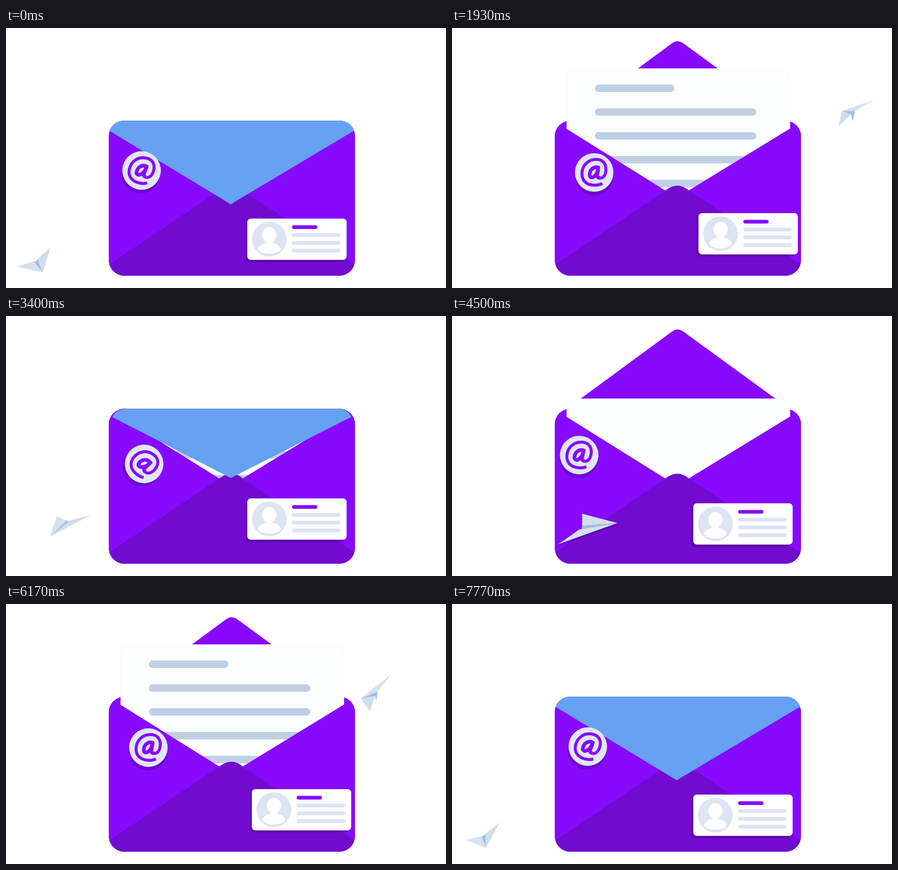
Recreate the animation shown at these times as an HTML page. Size 972 by 573 pixels, loop 7.91 s.

```html
<!DOCTYPE html>
<html lang="en">
<head>
<meta charset="utf-8">
<title>Mail envelope</title>
<style>
html, body { margin: 0; width: 100%; height: 100%; overflow: hidden; background: #fff; }
svg { display: block; width: 100%; height: 100%; }
.main { fill: #870aff; }
.dark { fill: #720bd0; }
.pale { fill: #dde4f2; }
.shade { fill: rgb(50, 0, 90); fill-opacity: .3; }
#lines line { stroke: #c0cfe3; stroke-width: 16.5; stroke-linecap: round; }
#sign path { fill: none; stroke: #870aff; stroke-linejoin: round; }
</style>
</head>
<body>
<svg viewBox="0 0 972 573">
  <defs>
    <clipPath id="body"><rect x="227" y="204" width="544" height="342" rx="35"/></clipPath>
  </defs>

  <rect class="main" x="227" y="204" width="544" height="342" rx="35"/>
  <g id="openFlap">
    <path class="main" d="M253 205L485 34.5Q498 24 512 34.5L746 205Z"/>
  </g>

  <g id="paper">
    <rect x="253.5" y="89.5" width="493" height="330" rx="22" fill="#fdfffe" stroke="#f6f6f9"/>
    <g id="lines"></g>
  </g>

  <g clip-path="url(#body)">
    <path class="main" d="M227 206L471 358L499 376L523 358L771 206.8V546H227Z"/>
    <path class="dark" d="M227 521.5L471 358Q498.5 337 523 358L771 521.5V546H227Z"/>
  </g>

  <g id="shutFlap">
    <path fill="#66a1f4" d="M228.5 226.5A34 34 0 0 1 261 204H737A34 34 0 0 1 769.5 226L503 384.5Q496.5 391.5 490 384.5Z"/>
  </g>

  <g id="badge">
    <circle class="shade" cy="8" r="42.5"/>
    <circle r="42.5" fill="#e0e7f4"/>
    <g id="sign">
      <path stroke-width="6.5" d="M18 24C13 27 7 28 1 28C-17 28 -27 18 -27 3C-27 -15 -14 -29 5 -29C18 -29 26 -20 26 -7C26 6 20 12.5 13 12.5"/>
      <path stroke-width="8" d="M9 -11C-2 -14 -10 -5 -10 5C-10 12 -3 13 2 7C6 3 8 -3 9 -11L7 5C6 10 9 12 13 12"/>
    </g>
  </g>

  <g id="card">
    <rect class="shade" x="-4" y="5" width="219" height="91" rx="8"/>
    <rect width="219.5" height="91" rx="8" fill="#fff"/>
    <circle class="pale" cx="48.8" cy="45.3" r="38.3"/>
    <g fill="#fff">
      <ellipse cx="48.8" cy="36.3" rx="15.7" ry="17.3"/>
      <path d="M41.5 48H56V54C67 56 73 61 74 68C66 81 31 81 23.5 68C25 61 31 56 41.5 54Z"/>
    </g>
    <rect class="main" x="99" y="14.7" width="56" height="8.2" rx="4.1"/>
    <g class="pale">
      <rect x="99" y="32" width="107" height="8.2" rx="4.1"/>
      <rect x="99" y="49.3" width="107" height="8.2" rx="4.1"/>
      <rect x="99" y="66.5" width="107" height="8.2" rx="4.1"/>
    </g>
  </g>

  <g clip-path="url(#body)"><path id="planeShade" class="shade" transform="translate(1 4)"/></g>
  <path id="keel" fill="#a6bedc"/>
  <path id="wingA" fill="#d6e1ef"/>
  <path id="wingB" fill="#d1ddec"/>
</svg>

<script>
const LOOP = 7910, LAST = 7770, CYCLE = 4000;
const $ = id => document.getElementById(id);
const set = (id, name, value) => $(id).setAttribute(name, value);
const show = (id, on) => set(id, 'visibility', on ? 'visible' : 'hidden');

const ramp = (t, a, b) => {
  const x = Math.min(1, Math.max(0, (t - a) / (b - a)));
  return x * x * (3 - 2 * x);
};
// A value that eases to each target in turn: [target, start, end].
const glide = (t, from, ...moves) =>
  moves.reduce((v, [to, a, b]) => v + (to - v) * ramp(t, a, b), from);

// Flight key points: time, x, y, heading, length, wing skew, half span.
// The heading makes one full turn to the left in each cycle.
const flight = [
  [0, 71, 521.5, 60, 40, 0, 43],
  [500, 313, 463, -7, 105, -30, 30],
  [1330, 829, 238, -28, 43, 31, 40],
  [1930, 877, 185.5, -171, 32, -34, 35],
  [2870, 411, 336, -205, 101, 12, 26],
  [3400, 123.5, 463, -221, 70, 29, 23.5],
  [3770, 71.5, 519, -281, 37, 12, 40]
];

function flightKey(i) {
  const n = flight.length, lap = Math.floor(i / n);
  const [t, x, y, heading, ...rest] = flight[i - lap * n];
  return [t + lap * CYCLE, x, y, heading - lap * 360, ...rest];
}

function flightAt(t) {
  let i = 0;
  while (flightKey(i + 1)[0] <= t) i++;
  const [before, a, b, after] = [-1, 0, 1, 2].map(d => flightKey(i + d));
  const slope = (p, q, r, c) => {
    const h0 = q[0] - p[0], h1 = r[0] - q[0];
    return ((q[c] - p[c]) / h0 * h1 + (r[c] - q[c]) / h1 * h0) / (h0 + h1);
  };
  const h = b[0] - a[0], u = (t - a[0]) / h, w = 1 - u;
  return a.map((v, c) => c === 0 ? t :
    v * (1 + 2 * u) * w * w + b[c] * u * u * (3 - 2 * u)
    + h * u * w * (slope(before, a, b, c) * w - slope(a, b, after, c) * u));
}

const poly = (id, ...pts) =>
  set(id, 'd', 'M' + pts.map(p => p.map(v => v.toFixed(2)).join(' ')).join('L') + 'Z');

function drawPlane(t) {
  const [, x, y, heading, len, skew, span] = flightAt(t);
  const r = heading * Math.PI / 180, c = Math.cos(r), s = Math.sin(r);
  const at = (along, side) => [x + along * c - side * s, y + along * s + side * c];
  const tail = -len / 2, fold = tail + len * .22;
  const nose = at(len / 2, 0);
  const tipA = at(tail + skew, span), tipB = at(tail - skew, -span);
  const inA = at(fold + skew * .12, span * .12), inB = at(fold - skew * .12, -span * .12);
  const drop = glide(t, 3, [18, 0, 500], [2, 1930, 2800]);
  const low = [(inA[0] + inB[0]) / 2, (inA[1] + inB[1]) / 2 + drop];
  poly('planeShade', nose, tipA, inA, low, inB, tipB);
  poly('keel', nose, inA, low, inB);
  poly('wingA', nose, tipA, inA);
  poly('wingB', nose, tipB, inB);
}

function drawFlap(t) {
  const c = glide(t, 1, [-1, 175, 508], [1, 3155, 3455]);
  const down = c > 0, k = Math.abs(c);
  show('shutFlap', down);
  show('openFlap', !down);
  const wide = down ? 1 - (1 - k) * .14 : 1;
  set(down ? 'shutFlap' : 'openFlap', 'transform',
    `translate(499 204.5) scale(${wide} ${k}) translate(-499 -204.5)`);
}

const LEFT = 324;
const rows = Array.from({ length: 5 }, (_, i) => {
  const el = document.createElementNS('http://www.w3.org/2000/svg', 'line');
  const y = 132.8 + 52.5 * i;
  el.setAttribute('x1', LEFT);
  el.setAttribute('y1', y);
  el.setAttribute('y2', y);
  $('lines').append(el);
  return { el, end: i ? 664 : 483, start: 600 + 100 * i };
});

function drawPaper(t) {
  const drop = glide(t, 120.5, [0, 285, 980], [120.5, 2495, 3240]);
  set('paper', 'transform', `translate(0 ${drop})`);
  for (const { el, end, start } of rows) {
    el.setAttribute('x2', glide(t, LEFT, [end, start, start + 300]));
    el.setAttribute('visibility', t > start ? 'visible' : 'hidden');
  }
}

function drawBadge(t) {
  const x = glide(t, 299.5, [281, 0, 500], [314.5, 950, 2000], [299.5, 2700, 3900]);
  const y = glide(t, 314, [306.5, 0, 500], [318.5, 800, 2000],
    [298, 2000, 2870], [326, 2870, 3400], [314, 3400, 3800]);
  const turn = glide(t, 13, [5, 0, 500], [0, 1300, 1930], [39, 1930, 3400], [13, 3400, 3770]);
  set('badge', 'transform', `translate(${x} ${y}) rotate(${turn})`);
}

function drawCard(t) {
  const x = glide(t, 533, [544.5, 500, 1400], [533, 1930, 3000]);
  const y = glide(t, 420, [406.5, 0, 950], [408, 1330, 1930], [402, 2870, 3400], [420, 3400, 3770]);
  set('card', 'transform', `translate(${x} ${y})`);
}

const parts = [drawFlap, drawPaper, drawBadge, drawCard, drawPlane];
const begin = performance.now();
function tick() {
  const t = Math.min((performance.now() - begin) % LOOP, LAST) % CYCLE;
  parts.forEach(draw => draw(t));
  requestAnimationFrame(tick);
}
tick();
</script>
</body>
</html>
```
